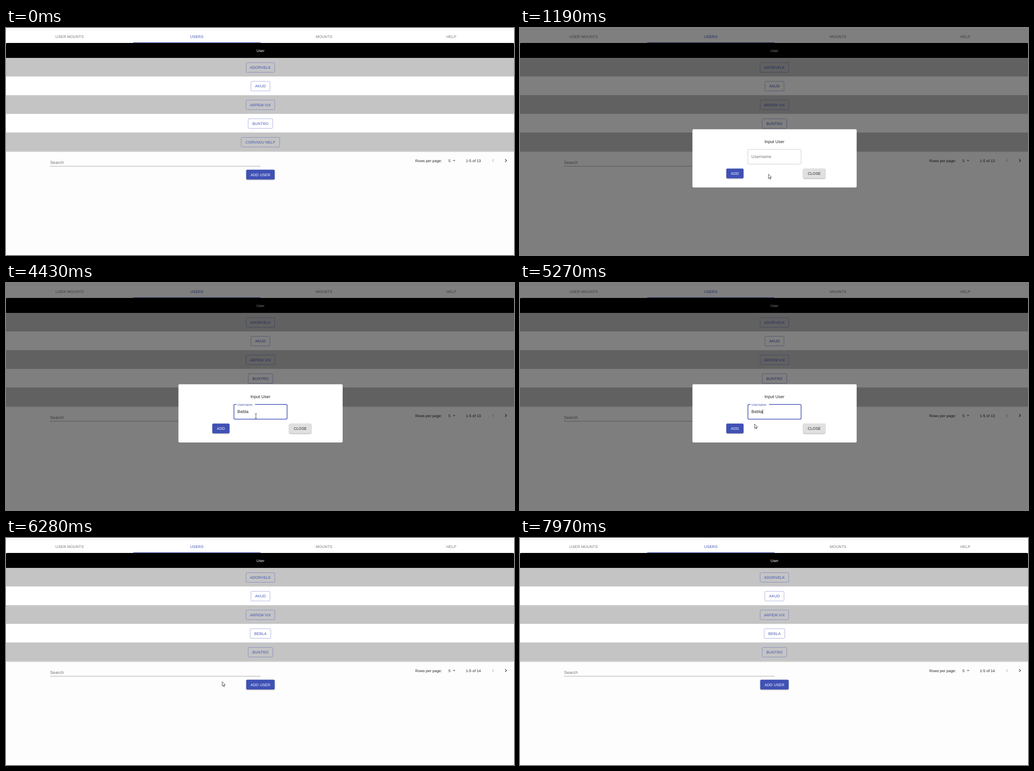
Recreate the animation shown at these times as an HTML page. Size 1118 by 501 pixels, loop 8110 ms.

```html
<!DOCTYPE html>
<html lang="en">
<head>
<meta charset="utf-8">
<title>User list</title>
<style>
html, body { margin: 0; width: 100%; height: 100%; overflow: hidden; background: #fdfdfd; }
svg { display: block; width: 1118px; height: 501px; }
text {
  font: 8.225px "Liberation Sans", Arial, sans-serif;
  letter-spacing: .09px;
  text-rendering: geometricPrecision;
  white-space: pre;
}
.caps { letter-spacing: .15px; text-anchor: middle; }
.mid { text-anchor: middle; }
.big { font-size: 9.4px; }
.raised { filter: drop-shadow(0 1px .8px rgba(0,0,0,.38)); }
.lifted { filter: drop-shadow(0 1.8px 1.8px rgba(0,0,0,.45)); }
</style>
</head>
<body>
<svg id="stage" viewBox="0 0 1118 501"></svg>
<script>
const LOOP = 8110;
const BLUE = '#3f51b5', DARK_BLUE = '#303f9f', INK = '#212121', MUTED = '#757575';
const OPEN = 1190, BLUR = 5850, CLOSE = 6280;

const NEW_USER = 'Bebla';
const CARET_OFFSETS = [0, 6.4, 11.7, 17, 19.1, 24.6];
const USERS = [['ADORVELK', 63], ['AKUD', 42], ['ARPEM VIX', 63], ['BUNTRO', 54], ['CORVADU NELP', 84.5]];
const USERS_AFTER = [...USERS.slice(0, 3), [NEW_USER.toUpperCase(), 45.5], USERS[3]];

// Each track lists [start time, value...]; values hold until the next entry.
const CURSOR = [
  [0, ''],
  [280, 'arrow', 930, 462], [410, 'arrow', 740, 400], [540, 'arrow', 610, 347],
  [670, 'hand', 553, 326], [800, 'hand', 547, 323],
  [1190, 'arrow', 546.8, 322.6], [1490, 'arrow', 548, 308], [1620, 'beam', 550, 293.6],
  [5130, 'beam', 541, 299], [5270, 'arrow', 516, 311], [5420, 'hand', 481, 320],
  [5560, 'hand', 476, 317.2], [6150, 'arrow', 475.8, 317.2],
  [7300, 'arrow', 500, 325], [7430, 'arrow', 600, 360], [7570, 'arrow', 760, 405],
  [7700, 'arrow', 940, 460], [7830, 'arrow', 1080, 489], [7970, '']
];
const TYPED = [[0, 0], [3040, 1], [3320, 2], [3460, 3], [3600, 4], [4300, 5]];
const CARET = [[0, 0], [1900, 1], [2340, 0], [2900, 1], [3870, 0], [4300, 1], [4430, 0], [4990, 1], [5560, 0]];
const LABEL = [[0, 0], [1760, .5], [1900, .93], [2060, 1]];
const ADD_USER_HOVER = [[0, 0], [670, .3], [800, .75], [930, 1], [1190, 0]];
const ADD_HOVER = [[0, 0], [5420, .5], [5560, 1]];
const RIPPLE = [[0, 0, 0], [5850, 6, .2], [5990, 16, .22], [6150, 24, .14]];

const at = (track, t) => track.findLast(entry => entry[0] <= t).slice(1);
const text = (x, y, str, fill, cls = '') => `<text x="${x}" y="${y}" fill="${fill}" class="${cls}">${str}</text>`;
const rect = (x, y, w, h, fill, extra = '') =>
  `<rect x="${x}" y="${y}" width="${w}" height="${h}" fill="${fill}" ${extra}/>`;
const icon = (x, y, d, fill) => `<path transform="translate(${x} ${y}) scale(.5875)" d="${d}" fill="${fill}"/>`;

function blend(from, to, p) {
  const channel = (hex, i) => parseInt(hex.slice(1 + 2 * i, 3 + 2 * i), 16);
  return `rgb(${[0, 1, 2].map(i => Math.round(channel(from, i) + (channel(to, i) - channel(from, i)) * p))})`;
}

function button(cx, y, w, label, hover = 0, fill = BLUE, ink = '#fff') {
  const color = hover ? blend(BLUE, DARK_BLUE, hover) : fill;
  return rect(cx - w / 2, y, w, 21.5, color, `rx="2.35" class="${hover ? 'lifted' : 'raised'}"`)
    + text(cx, y + 13.7, label, ink, 'caps');
}

function userRow([name, w], i) {
  const y = 66 + i * 41.25;
  return (i % 2 ? rect(0, y, 1118, 41.25, '#fff') : rect(0, y, 1118, 41.25, '#c4c4c4'))
    + rect(0, y + 40.7, 1118, .55, '#d8d8d8')
    + rect(560 - w / 2, y + 10.5, w, 21.2, 'none', `rx="2.2" stroke="${BLUE}" stroke-opacity=".5" stroke-width=".9"`)
    + text(560, y + 24.1, name, BLUE, 'caps');
}

function page(t) {
  const added = t >= CLOSE;
  const tabs = ['USER MOUNTS', 'USERS', 'MOUNTS', 'HELP'];
  return rect(0, 0, 1118, 501, '#fdfdfd')
    + rect(0, 3.6, 1118, 1.2, '#ececec')
    + rect(0, 4.8, 1118, 29, '#fff')
    + tabs.map((tab, i) => text(140 + 280 * i, 22, tab, i === 1 ? BLUE : MUTED, 'caps')).join('')
    + rect(280, 31.8, 280, 1.2, BLUE)
    + rect(0, 250, 1118, 23.6, '#d2d2d2', 'rx="2.4"')
    + `<path d="M0 66V35.4Q0 33 2.4 33H1115.6Q1118 33 1118 35.4V66Z"/>`
    + text(560, 52.5, 'User', '#fff', 'mid')
    + (added ? USERS_AFTER : USERS).map(userRow).join('')
    + text(97, 299.9, 'Search', MUTED, 'big')
    + rect(97, 304.7, 463, .8, '#8c8c8c')
    + text(900.8, 295.6, 'Rows per page:', INK)
    + text(973.8, 295.6, '5', INK)
    + icon(979.1, 285.5, 'M7 10l5 5 5-5z', MUTED)
    + text(1012, 295.6, `1-5 of ${added ? 14 : 13}`, INK)
    + icon(1065, 285.5, 'M15.41 7.41L14 6l-6 6 6 6 1.41-1.41L10.83 12z', '#bdbdbd')
    + icon(1093, 285.5, 'M10 6L8.59 7.41 13.17 12l-4.58 4.59L10 18l6-6z', INK)
    + button(560, 312.8, 62.5, 'ADD USER', at(ADD_USER_HOVER, t)[0]);
}

function usernameField(t) {
  const [p] = at(LABEL, t), [typed] = at(TYPED, t), [caret] = at(CARET, t);
  const focused = p > 0 && t < BLUR;
  const hovered = t >= 1620 && !p;
  const border = focused ? BLUE : hovered ? INK : '#c4c4c4';
  const notch = 41 * p;
  return rect(501.6, 268, 117, 32.4, 'none', `rx="2.2" stroke="${border}" stroke-width="${focused ? 1.5 : .9}"`)
    + rect(527.5 - notch / 2, 266.8, notch, 2.4, '#fff')
    + `<g transform="translate(509.3 ${287.4 - 16.9 * p}) scale(${1 - .25 * p})">`
    + text(0, 0, 'Username', focused ? BLUE : MUTED, 'big') + '</g>'
    + text(509.3, 287.4, NEW_USER.slice(0, typed), INK, 'big')
    + (caret ? rect(509.2 + CARET_OFFSETS[typed], 279, .8, 10, '#000') : '');
}

function dialog(t) {
  const [radius, opacity] = at(RIPPLE, t);
  return rect(0, 0, 1118, 501, '#000', 'opacity=".5"')
    + rect(379.5, 223.6, 361.4, 128.3, '#fff', 'rx="2.4"')
    + text(560, 254.4, 'Input User', INK, 'big mid')
    + usernameField(t)
    + button(473, 310.2, 37.8, 'ADD', at(ADD_HOVER, t)[0])
    + '<clipPath id="add"><rect x="454.1" y="310.2" width="37.8" height="21.5" rx="2.35"/></clipPath>'
    + `<g clip-path="url(#add)"><circle cx="476" cy="317" r="${radius}" fill="#fff" opacity="${opacity}"/></g>`
    + button(647.6, 310.2, 48.6, 'CLOSE', 0, '#e0e0e0', INK);
}

const POINTERS = {
  arrow: '<path d="M0 0V16.5L3.8 13 6.4 19 8.8 18 6.3 12.2H11.6Z" fill="#fff" stroke="#000" stroke-width="1.2"/>',
  hand: '<path transform="translate(-7.5 0)" d="M6 12V2q1.5-2.5 3 0v6q2-1.5 3 .5 2-1 3 .6 2-.6 2.5 1.4v5l-2 4v3H7.5v-2L3 14.5q-2-3 0-3.5 1.5 0 3 2.5z" fill="#fff" stroke="#000" stroke-width="1.2"/>',
  beam: '<path d="M-4-8.5H-1L0-7.5 1-8.5H4M0-7.5V7.5M-4 8.5H-1L0 7.5 1 8.5H4" fill="none" stroke="#222" stroke-width="1.4"/>'
};

function pointer(t) {
  const [shape, x, y] = at(CURSOR, t);
  return shape ? `<g transform="translate(${x} ${y}) scale(.5875)">${POINTERS[shape]}</g>` : '';
}

const stage = document.getElementById('stage');
const start = performance.now();
let shown = '';

function draw() {
  const t = (performance.now() - start) % LOOP;
  const scene = page(t) + (t >= OPEN && t < CLOSE ? dialog(t) : '') + pointer(t);
  if (scene !== shown) stage.innerHTML = shown = scene;
  requestAnimationFrame(draw);
}
draw();
</script>
</body>
</html>
```
